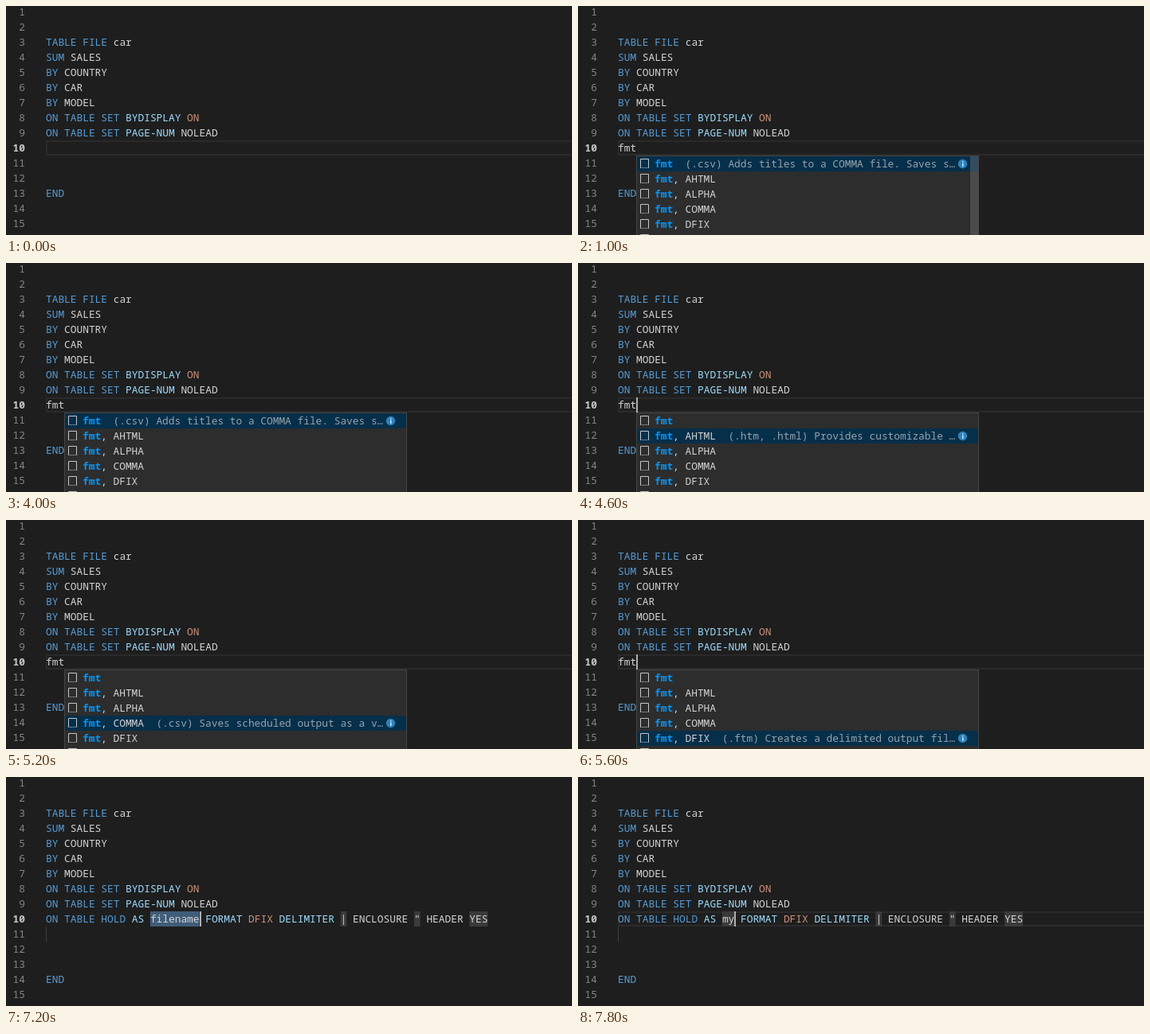
These frames come from a looping animation (710 by 288 pixels, 8000 ms). An HTML page with a canvas:

```html
<!DOCTYPE html>
<html lang="en">
<head>
<meta charset="utf-8">
<title>Snippet completion</title>
<style>
  html, body { margin: 0; height: 100%; overflow: hidden; background: #1e1e1e; }
  canvas { display: block; }
</style>
</head>
<body>
<canvas id="stage" width="710" height="288"></canvas>
<script>
const ctx = document.getElementById('stage').getContext('2d');
const LOOP = 8000, CHAR = 7.7, LINE = 19, LEFT = 50;
const FONT = '12.8333px "Noto Sans Mono", "DejaVu Sans Mono", monospace';
const BLUE = '#569cd6', WHITE = '#d4d4d4', SKY = '#9cdcfe', ORANGE = '#ce9178';
const MATCH = '#0097fb', BOX = '#3a3a3a';

const options = [
  ['', '(.csv) Adds titles to a COMMA file. Saves s…'],
  [', AHTML', '(.htm, .html) Provides customizable …'],
  [', ALPHA', '(.ftm) Saves report output as fixed …'],
  [', COMMA', '(.csv) Saves scheduled output as a v…'],
  [', DFIX', '(.ftm) Creates a delimited output fil…']
];

const lineTop = n => LINE * n - 21;
const column = c => LEFT + c * CHAR;

function rect(x, y, w, h, color) {
  ctx.fillStyle = color;
  ctx.fillRect(x, y, w, h);
}

// Places every word on the character grid.
function write(text, x, y, color, bold) {
  ctx.font = (bold ? 'bold ' : '') + FONT;
  ctx.fillStyle = color;
  for (const word of text.matchAll(/\S+/g)) ctx.fillText(word[0], x + word.index * CHAR, y);
}

function code(n, ...parts) {
  let col = 0;
  for (let i = 0; i < parts.length; i += 2) {
    write(parts[i], column(col), lineTop(n) + 14, parts[i + 1]);
    col += parts[i].length;
  }
}

function drawEditor(inserted, selecting) {
  rect(0, 0, 710, 288, '#1e1e1e');
  if (!selecting) {
    ctx.strokeStyle = '#2a2a2a';
    ctx.lineWidth = 2;
    ctx.strokeRect(51, 170, 670, 17);
  }
  for (let n = 1; n <= 15; n++) {
    const label = String(n), active = n === 10;
    write(label, 24 - label.length * CHAR, lineTop(n) + 14, active ? '#c6c6c6' : '#858585', active);
  }
  code(3, 'TABLE FILE', BLUE, ' car', WHITE);
  code(4, 'SUM', BLUE, ' SALES', WHITE);
  code(5, 'BY', BLUE, ' COUNTRY', WHITE);
  code(6, 'BY', BLUE, ' CAR', WHITE);
  code(7, 'BY', BLUE, ' MODEL', WHITE);
  code(8, 'ON TABLE SET', BLUE, ' BYDISPLAY', SKY, ' ON', ORANGE);
  code(9, 'ON TABLE SET', BLUE, ' PAGE-NUM', SKY, ' NOLEAD', WHITE);
  code(inserted ? 14 : 13, 'END', BLUE);
}

function drawSnippet(name, selecting) {
  const end = 17 + name.length;
  const field = (col, length, color) => rect(column(col), lineTop(10), length * CHAR, LINE, color);
  field(17, name.length, selecting ? '#405d79' : BOX);
  field(end + 23, 1, BOX);
  field(end + 35, 1, BOX);
  field(end + 44, 3, BOX);
  rect(LEFT, lineTop(11), 1, LINE, '#404040');
  code(10, 'ON TABLE HOLD', BLUE, ' AS ', SKY, name, WHITE, ' FORMAT', SKY, ' DFIX', ORANGE,
    ' DELIMITER', SKY, ' | ENCLOSURE " HEADER YES', WHITE);
}

function drawIcon(y) {
  ctx.strokeStyle = '#c5c5c5';
  ctx.lineWidth = 1;
  ctx.beginPath();
  ctx.moveTo(78.5, y + 14);
  ctx.lineTo(78.5, y + 3.5);
  ctx.lineTo(88.5, y + 3.5);
  ctx.lineTo(88.5, y + 14);
  ctx.stroke();
  for (let x = 78; x < 89; x += 2) rect(x, y + 14, 1, 1, '#c5c5c5');
}

function drawInfo(y) {
  ctx.fillStyle = '#2b83bd';
  ctx.beginPath();
  ctx.arc(482.5, y + 9.5, 5.7, 0, 7);
  ctx.fill();
  rect(482, y + 6, 1.5, 1.5, '#d8e6f0');
  rect(482, y + 8.5, 1.5, 4.5, '#d8e6f0');
}

function drawPopup(selected, scrollbar) {
  rect(73, 188, 430, 100, '#454545');
  rect(74, 189, 428, 99, '#2d2d2d');
  options.forEach(([name, detail], i) => {
    const y = 189 + i * LINE;
    if (i === selected) {
      rect(74, y, 428, LINE, '#062f4a');
      write(detail, 96 + (name.length + 5) * CHAR, y + 14, '#96a3ac');
      drawInfo(y);
    }
    drawIcon(y);
    write('fmt', 96, y + 14, MATCH, true);
    write(name, 96 + 3 * CHAR, y + 14, WHITE);
  });
  drawIcon(284);
  rect(492, 189, 10, 99, `rgba(121,121,121,${0.4 * scrollbar})`);
}

function cursorVisible(t) {
  if (t < 1600) return t >= 200 && t < 1000;
  if (t < 6000) return (t - 1600) % 1000 < 400;
  return t < 6600 || t >= 7000;
}

function draw(t) {
  const inserted = t >= 6000, selecting = inserted && t < 7600;
  let caret;
  drawEditor(inserted, selecting);
  if (inserted) {
    const name = selecting ? 'filename' : t < 7800 ? 'm' : 'my';
    drawSnippet(name, selecting);
    caret = 17 + name.length;
  } else {
    caret = Math.min(3, Math.floor(t / 200));
    code(10, 'fmt'.slice(0, caret), WHITE);
    if (t >= 600) {
      const selected = [4600, 4800, 5200, 5400].filter(start => t >= start).length;
      drawPopup(selected, Math.max(0, Math.min(1, (1900 - t) / 800)));
    }
  }
  if (cursorVisible(t)) rect(Math.round(column(caret)), lineTop(10), 2, LINE, '#aeafad');
}

function tick() {
  draw(performance.now() % LOOP);
  requestAnimationFrame(tick);
}
tick();
</script>
</body>
</html>
```
